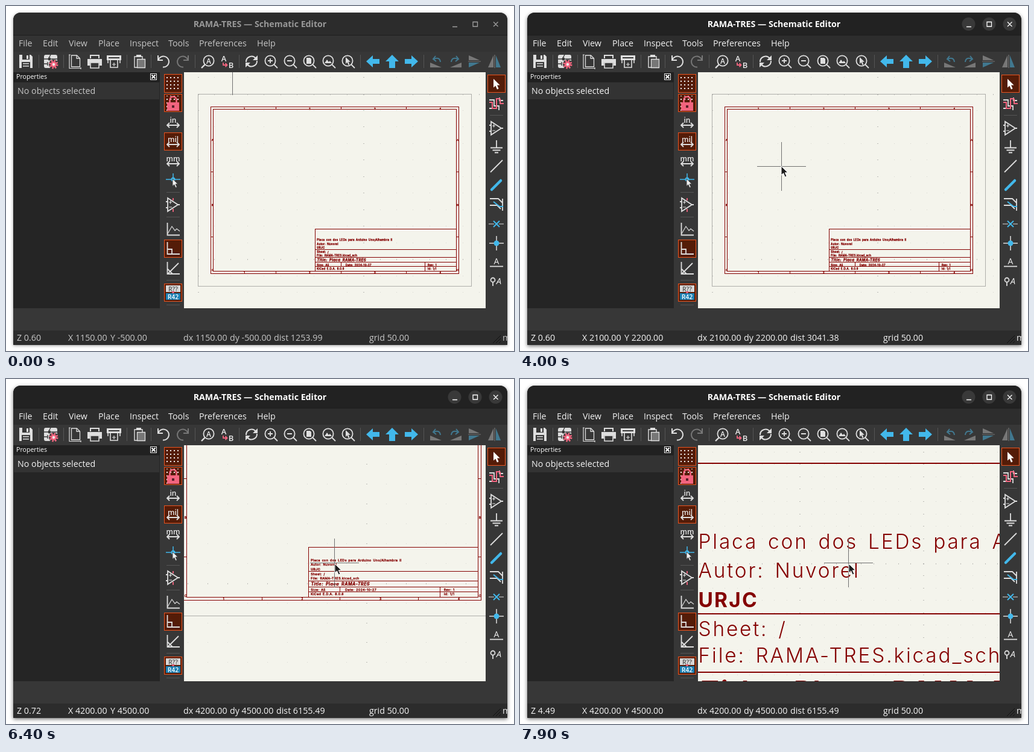
An HTML page with a canvas for the animation above (8 s loop, 842 by 573 pixels).

```html
<!DOCTYPE html>
<html lang="en">
<head>
<meta charset="utf-8">
<title>Schematic Editor</title>
<style>
html, body { margin: 0; width: 100%; height: 100%; overflow: hidden; background: #fff; }
#stage { position: relative; width: 842px; height: 573px; overflow: hidden; background: #fff; }
#shadow, #win { position: absolute; left: 12px; top: 11px; width: 819px; height: 552px; border-radius: 12px 12px 1px 1px; }
#shadow { box-shadow: 0 1px 5px rgba(0,0,0,.4); }
.focus #shadow { box-shadow: 0 2px 6px rgba(0,0,0,.55); }
#win { overflow: hidden; background: #373737; }
#ui { position: absolute; left: -12px; top: -11px; }
#view { position: absolute; left: 283px; top: 99px; }
#top { position: absolute; left: 0; top: 0; }
text { font-family: "Open Sans", "Noto Sans", sans-serif; font-size: 14.25px; white-space: pre; }
.lbl text { fill: #c6c6c6; }
.focus .lbl text { fill: #f4f4f4; }
#bar { fill: #2c2c2c; }
.focus #bar { fill: #222; }
#menu { fill: #333; }
.focus #menu { fill: #2d2d2d; }
#title { font-weight: 700; font-size: 14.2px; text-anchor: middle; fill: #989898; }
.focus #title { fill: #fff; }
#dots { fill: none; }
.focus #dots { fill: #393939; }
#ctl { fill: none; stroke: #a0a0a0; stroke-width: 1.3; }
.focus #ctl { stroke: #fff; }
.w { fill: none; stroke: #dedede; stroke-width: 1.8; }
.t { stroke-width: 1.2; }
.f { fill: #dedede; }
.b { fill: #42b8eb; }
.bl { fill: none; stroke: #42b8eb; stroke-width: 2; }
.p { fill: #f2647e; }
.pl { fill: none; stroke: #f2647e; stroke-width: 1.8; }
.k { fill: #373737; }
.kl { fill: none; stroke: #373737; stroke-width: 1.4; }
.g { fill: #777; }
.gl { fill: none; stroke: #777; stroke-width: 2; }
.bg { fill: #41788f; }
.sep { stroke: #555; stroke-width: 1; fill: none; }
.on rect { fill: #541c08; stroke: #e95420; }
.u text { font-size: 12px; font-weight: 600; text-anchor: middle; fill: #ececec; }
</style>
</head>
<body>
<div id="stage">
<div id="shadow"></div>
<div id="win">
<svg id="ui" width="842" height="573" viewBox="0 0 842 573">
  <defs>
    <g id="lens"><circle class="w" r="8.6"/><path class="w" d="M6 6l6 6" stroke-width="2.4"/></g>
    <path id="arrow" d="M0 0V14.5L3.4 11.4L6 17.4L8.6 16.3L6 10.4H10.6Z"/>
    <g id="amp"><path class="w" d="M-8-11V11L9 0ZM-11-5h3M-11 5h3M9 0h3"/><path class="w t" d="M-6-4h5M-3.500-6.500v5M-6 4h5"/></g>
    <path id="dbl" class="w" d="M-9 0H9M-6-4L-10 0L-6 4M6-4L10 0L6 4" stroke-width="1.6"/>
    <pattern id="gridDots" x="265" width="6" height="6" y="117" patternUnits="userSpaceOnUse"><rect x="1" y="1" width="2" height="2" fill="#f0f0f0"/></pattern>
  </defs>
  <rect id="menu" x="12" y="48" width="819" height="28"/>
  <rect id="bar" x="12" y="11" width="819" height="37"/>
  <rect x="12" y="48" width="819" height="1" fill="#1e1e1e"/>
  <rect x="12" y="539" width="819" height="24" fill="#2c2c2c"/>
  <rect x="12" y="110" width="243" height="392" fill="#252525"/>
  <rect x="12" y="110" width="243" height="16" fill="#212121"/>
  <rect x="13" y="127" width="241" height="28" fill="#333"/>

  <text id="title" x="421" y="35">RAMA-TRES — Schematic Editor</text>
  <g id="dots"><circle cx="743.500" cy="30" r="11"/><circle cx="777.500" cy="30" r="11"/><circle cx="811.500" cy="30" r="11"/></g>
  <path id="ctl" d="M740 34.500h8M774 26.500h7.500v7.500h-7.500zM808 26.500l7.500 7.500M815.500 26.500l-7.500 7.500"/>

  <g class="lbl">
    <text x="21" y="67">File</text><text x="61" y="67">Edit</text><text x="104" y="67">View</text>
    <text x="153" y="67">Place</text><text x="205" y="67">Inspect</text><text x="269" y="67">Tools</text>
    <text x="320" y="67">Preferences</text><text x="416" y="67">Help</text>
    <text x="19" y="146">No objects selected</text>
    <text id="sz" x="18" y="556"></text>
    <text id="sx" x="103" y="556"></text><text id="sy" x="173" y="556"></text>
    <text id="sdx" x="294" y="556"></text><text id="sdy" x="371" y="556"></text>
    <text id="sd" x="444" y="556"></text>
    <text x="602" y="556">grid 50.00</text><text x="823" y="556">mils</text>
  </g>
  <path d="M807 560l13-13M812 560l8-8M817 560l3-3" stroke="#111" fill="none"/>
  <text x="17" y="121" style="font-size:10.600px" fill="#fff">Properties</text>
  <rect x="239.500" y="112.500" width="10" height="10" fill="#191919" stroke="#eee"/>
  <path d="M241.500 114.500l6 6M247.500 114.500l-6 6" stroke="#fff" stroke-width="2"/>

  <path class="sep" d="M54.500 81v22M95.500 81v22M200.500 81v22M240.500 81v22M313.500 81v22M386.500 81v22M587.500 81v22M692.500 81v22"/>
  <!-- top toolbar -->
  <path class="f" d="M22 81h19l3 3v19H22z"/><path class="k" d="M27 81h12v8H27zM26 93h14v10H26z"/><path class="f" d="M34 82h3v6h-3zM28 95h10v1.500H28zM28 99h10v1.500H28z"/>
  <rect class="f" x="63" y="81" width="22" height="22" rx="3"/><path class="kl" d="M63 88h7l4-7M63 96h6M69 93v6M75 88h10"/><circle cx="72" cy="88" r="2.500" class="k"/>
  <circle class="k" cx="79" cy="97" r="8"/><circle class="pl" cx="79" cy="97" r="6" stroke-dasharray="2.400 2.300" style="stroke-width:3"/><circle class="p" cx="79" cy="97" r="5"/><circle cx="79" cy="97" r="2.200" fill="#eee"/>
  <path class="w" d="M108.500 82h9l5 5v14h-14zM117 82v5h5" style="stroke-width:1.300"/><path class="w t" d="M105 81v23M105 103.500h19M104 81h3M124 102v3"/>
  <path class="f" d="M139 81h16v6h-16zM135 88h24v11h-4v-5h-16v5h-4z"/><path class="w" d="M140 94h14v9h-14z" style="stroke-width:1.600"/><path class="k" d="M141 83h12v4h-12z"/>
  <path class="f" d="M167 82h24v8h-24z"/><path class="k" d="M170 85h18v2h-18z"/><path class="w" d="M173 90v12h12v-12M169 90v5M189 90v5" style="stroke-width:1.600"/><path class="w t" d="M176 97h6M179 94v6"/>
  <path class="w" d="M213 84h13v18h-13z" style="stroke-width:1.400"/><path class="f" d="M216 81h8v4h-8z"/><path d="M217.500 88.500h13v14h-13z" fill="#777" stroke="#dedede" stroke-width="1.300"/>
  <path class="w" d="M252 82v8h8M252.500 89.500A9 9 0 1 1 260 101.500" style="stroke-width:2"/>
  <path class="gl" d="M302 82v8h-8M301.500 89.500A9 9 0 1 0 294 101.500"/>
  <circle class="w" cx="336" cy="91" r="8.600"/><path class="w" d="M330 97l-6 6" style="stroke-width:2.400"/>
  <g class="u"><text x="336" y="95.500">A</text><text x="361" y="92" style="font-size:13px">A</text><text x="373" y="103" style="font-size:13px">B</text></g>
  <path class="pl" d="M360 94v4h6M363.500 95l3 3l-3 3"/>
  <path class="w" d="M398 93A9 9 0 0 1 414 87M416 91A9 9 0 0 1 400 97" style="stroke-width:2"/><path class="f" d="M417 82v8h-8zM397 102v-8h8z"/>
  <use href="#lens" x="438" y="91"/><path class="w" d="M434 91h8M438 87v8"/>
  <use href="#lens" x="470" y="91"/><path class="w" d="M466 91h8"/>
  <use href="#lens" x="502" y="91"/><path class="f" d="M498 86h6l2 2v8h-8z"/>
  <use href="#lens" x="534" y="91"/><path class="f" d="M528 95l4-6l3 4l2-2l3 4z"/>
  <use href="#lens" x="566" y="91"/><use href="#arrow" class="f" transform="translate(563 85) scale(.75)"/>
  <path class="b" d="M597 92l11-10v6h11v8h-11v6zM640 81l11 11h-6v11h-10V92h-6zM683 92l-11-10v6h-11v8h11v6z"/>
  <path class="g" d="M703 94l19 8h-19z"/><path class="gl" d="M709 88q10-4 11 5M712 83l-4 5l5 4" style="stroke:#41788f"/>
  <path class="g" d="M755 94l-19 8h19z"/><path class="gl" d="M749 88q-10-4-11 5M746 83l4 5l-5 4" style="stroke:#41788f"/>
  <path class="g" d="M767 82l18 8h-18z"/><path class="bg" d="M767 102l18-8h-18z"/><path class="gl" d="M766 92h21" style="stroke-width:1.200"/>
  <path class="g" d="M808 82v20h-9z"/><path class="bg" d="M812 82v20h8z"/><path class="gl" d="M810 81v22" style="stroke-width:1.200"/>

  <!-- left toolbar -->
  <g class="on"><rect x="262.500" y="113.500" width="29" height="30"/><rect x="262.500" y="146.500" width="29" height="29"/><rect x="262.500" y="210.500" width="29" height="29"/><rect x="262.500" y="388.500" width="29" height="29"/><rect x="262.500" y="461.500" width="29" height="29"/><rect x="798.500" y="114.500" width="29" height="29"/></g>
  <rect x="265" y="117" width="24" height="24" fill="url(#gridDots)"/><rect x="265" y="149" width="24" height="25" fill="url(#gridDots)"/>
  <path class="p" d="M267 160h20v14h-20z"/><path class="pl" d="M271.500 160v-4a5.500 5.500 0 0 1 11 0v4" style="stroke-width:2.600"/><path d="M275 165h4v4h-4z" fill="#5a1f2a"/>
  <g class="u"><text x="277" y="194">in</text><text x="277" y="226">mil</text><text x="277" y="258">mm</text></g>
  <use href="#dbl" x="277" y="198"/><use href="#dbl" x="277" y="230"/><use href="#dbl" x="277" y="262"/>
  <path class="bl" d="M265 288h24M277 278v20" style="stroke-width:1.500"/><circle class="b" cx="277" cy="288" r="3.500"/><use href="#arrow" transform="translate(276 287) scale(.85)" fill="#eee" stroke="#373737"/>
  <path class="sep" d="M266 309.500h22M266 350.500h22M266 455.500h22M266 496.500h22M802 181.500h22"/>
  <use href="#amp" x="276" y="330"/><path class="pl" d="M277 319v4M277 337v5"/>
  <path class="w" d="M267.500 360v20.500H288"/><path class="w t" d="M268 378l7-12l5 7l3-3l5 4"/>
  <path class="w" d="M267.500 392v20H288M268 404h7v8"/>
  <path class="w" d="M267.500 425v20H288M268 445l18-18M268 437l8 8"/>
  <rect x="265" y="464" width="24" height="11" fill="#d8d8d8"/><rect x="265" y="477" width="24" height="11" fill="#1a7fb3"/>
  <g class="u"><text x="277" y="473.500" style="font-size:10.500px;fill:#555">R??</text><text x="277" y="487" style="font-size:10.500px;fill:#fff">R42</text></g>
  <path class="p" d="M274 474h6l-3 4z"/>

  <!-- right toolbar -->
  <use href="#arrow" class="f" x="808" y="121" style="fill:#fff"/>
  <path class="w" d="M801 156h8v10h8v7M801 170h9M824 157h-6v-5"/><path class="pl" d="M801 160h5v10h7v-16h6M819 154v8h6" style="stroke-width:2"/>
  <use href="#amp" x="812" y="203"/>
  <path class="w" d="M813 223v12M803 235.500h20M806.500 239.500h13M810 243.500h6"/>
  <path class="w" d="M803 276l20-20"/>
  <path class="bl" d="M805 305l15-15" style="stroke-width:4.500;stroke-linecap:round"/>
  <path class="w" d="M802 320h14l7 7M802 331h12l6 6M823 320v20"/><path class="bl" d="M808 325l10 8h6"/>
  <path class="bl" d="M808 357l10 10M818 357l-10 10"/><path class="w t" d="M800 362h9M817 362h8"/>
  <path class="w" d="M801 394h24M813 382v24" style="stroke-width:1.500"/><circle class="b" cx="813" cy="394" r="4.500"/>
  <path class="w" d="M802 432.500h22"/><g class="u"><text x="813" y="429" style="font-size:14px;font-weight:400">A</text><text x="817" y="462" style="font-size:15px;font-style:italic;font-weight:400">A</text></g>
  <circle class="w" cx="807" cy="455" r="3.500"/><path class="w" d="M807 459v6"/>
</svg>
<canvas id="view" width="500" height="392"></canvas>
</div>
<svg id="top" width="842" height="573" viewBox="0 0 842 573">
  <path id="ptr" d="M0 0V15L3.600 11.700L6.200 18L9 16.800L6.300 10.800H11Z" fill="#1c1c1c" stroke="#fff" stroke-width="1"/>
</svg>
</div>
<script>
const $ = id => document.getElementById(id);
const ctx = $('view').getContext('2d');
const LOOP = 8000, MM = 39.37, UNIT = 0.0915, RED = '#840000';
const RIGHT = 7874, BOTTOM = 5433.1, MARGIN = 393.7; // page frame in mils

const linear = u => u, easeIn = u => u * u;
const easeOut = u => 1 - (1 - u) ** 2, smooth = u => u * u * (3 - 2 * u);

// pointer moves: start, end, from, to, easing
const moves = [
  [400, 1000, [213, -30], [320, 20], easeOut],
  [2000, 2100, [320, 20], [319.5, 20], linear],
  [2700, 3200, [319.5, 20], [326, 85], easeIn],
  [3500, 4000, [326, 85], [433, 266], smooth],
  [4200, 5100, [433, 266], [527, 385], linear],
  [5100, 5300, [527, 385], [548.5, 394], easeOut],
  [6300, 6400, [548.5, 394], [545, 307], linear]
];

// title block: text, mm from the right, mm from the bottom, size, style
const notes = [
  ['Placa con dos LEDs para Arduino Uno/Alhambra II', 109, 26],
  ['Autor: Nuvorel', 109, 23],
  ['URJC', 109, 20, 1.5, 'bold'],
  ['Sheet: /', 109, 17],
  ['File: RAMA-TRES.kicad_sch', 109, 14.3],
  ['Title: Placa RAMA-TRES', 109, 10.7, 2, 'italic bold'],
  ['Size: A5', 109, 6.9], ['Date: 2024-10-27', 87, 6.9], ['Rev: 1', 24, 6.9],
  ['KiCad E.D.A. 8.0.6', 109, 4.1], ['Id: 1/1', 24, 4.1]
];
const rules = [[110, 18.5, 2, 18.5], [110, 12.5, 2, 12.5], [110, 8.5, 2, 8.5],
  [110, 5.5, 2, 5.5], [90, 8.5, 90, 5.5], [26, 8.5, 26, 2]];

function pointer(t) {
  let p = [0, -60];
  for (const [a, b, from, to, ease] of moves) {
    if (t <= a) break;
    const u = ease(Math.min(1, (t - a) / (b - a)));
    p = from.map((v, i) => v + (to[i] - v) * u);
  }
  return p;
}

function zoomAt(t) {
  if (t < 6400) return 0.6;
  const n = Math.min(8, (t - 6400) / 100) + Math.max(0, Math.min(4, (t - 7500) / 100));
  return 0.72 * 1.1648 ** n;
}

function drawSheet(s, ox, oy) {
  const X = x => ox + x * s, Y = y => oy + y * s;
  const lw = Math.max(1, Math.round(5.9 * s));
  const snap = v => lw % 2 ? Math.floor(v) + 0.5 : Math.round(v);
  const line = (a, b, c, d) => {
    ctx.beginPath();
    ctx.moveTo(snap(X(a)), snap(Y(b)));
    ctx.lineTo(snap(X(c)), snap(Y(d)));
    ctx.stroke();
  };
  const box = (a, b, c, d) => ctx.strokeRect(snap(X(a)), snap(Y(b)),
    snap(X(c)) - snap(X(a)), snap(Y(d)) - snap(Y(b)));
  const label = (str, x, y, mm = 1.5, style = '') => {
    const cap = mm * MM * s, size = cap / 0.727, bold = style.includes('bold');
    ctx.font = `${style || '300'} ${size}px Inter, Roboto, sans-serif`;
    ctx.letterSpacing = size * (bold ? 0.065 : 0.085) + 'px';
    ctx.wordSpacing = size * (bold ? 0.26 : 0.14) + 'px';
    const px = X(x) + 0.12 * size, py = Y(y) + cap / 2 + 0.5;
    ctx.fillText(str, px, py);
    const extra = (1 - 5.9 * s) * (bold ? 0.5 : 0.8);
    if (extra > 0.05) { ctx.lineWidth = extra; ctx.strokeText(str, px, py); }
  };

  // grid
  const step = 50 * s < 10 ? 500 : 50, major = step * 10;
  const first = (edge, o) => Math.ceil((edge - o) / s / step) * step;
  for (let x = first(295, ox); X(x) < 795; x += step)
    for (let y = first(110, oy); Y(y) < 502; y += step) {
      const mx = x % major === 0, my = y % major === 0;
      ctx.fillStyle = mx || my ? '#bcbcb7' : '#d6d6d0';
      ctx.fillRect(Math.floor(X(x)), Math.floor(Y(y)), mx ? 2 : 1, my ? 2 : 1);
    }

  ctx.lineWidth = lw;
  ctx.strokeStyle = '#aeaeaa';
  box(0, 0, RIGHT + MARGIN, BOTTOM + MARGIN);
  ctx.strokeStyle = ctx.fillStyle = RED;
  const in2 = 2 * MM;
  box(MARGIN, MARGIN, RIGHT, BOTTOM);
  box(MARGIN + in2, MARGIN + in2, RIGHT - in2, BOTTOM - in2);
  box(RIGHT - 110 * MM, BOTTOM - 34 * MM, RIGHT - in2, BOTTOM - in2);
  for (const [a, b, c, d] of rules)
    line(RIGHT - a * MM, BOTTOM - b * MM, RIGHT - c * MM, BOTTOM - d * MM);

  // frame ticks and references
  for (let i = 1; i < 4; i++) {
    const p = MARGIN + i * 50 * MM;
    line(p, MARGIN, p, MARGIN + in2);
    line(p, BOTTOM - in2, p, BOTTOM);
    if (i < 3) {
      line(MARGIN, p, MARGIN + in2, p);
      line(RIGHT - in2, p, RIGHT, p);
    }
  }
  for (let i = 0; i < 4; i++) {
    const p = MARGIN + (i * 50 + 25) * MM;
    label(i + 1, p, MARGIN + MM, 1.3);
    label(i + 1, p, BOTTOM - MM, 1.3);
    if (i < 3) {
      label('ABC'[i], MARGIN + 0.4 * MM, p, 1.3);
      label('ABC'[i], RIGHT - 1.6 * MM, p, 1.3);
    }
  }
  for (const [str, x, y, mm, style] of notes)
    label(str, RIGHT - x * MM, BOTTOM - y * MM, mm, style);
}

function drawCross(x, y) {
  ctx.fillStyle = '#707070';
  ctx.fillRect(x - 40, y, 81, 1);
  ctx.fillRect(x, y - 40, 1, 81);
}

function render(t) {
  const zoom = zoomAt(t), s = zoom * UNIT, zoomed = t >= 6400;
  const ox = zoomed ? 545.2 - 4200 * s : 318.05;
  const oy = zoomed ? 306.2 - 4500 * s : 146.05;
  const [px, py] = pointer(t);
  const grid = v => Math.round(v / 50) * 50;
  let mx = 1150, my = -500, cx = 375, cy = 107;
  if (zoomed) {
    [mx, my, cx, cy] = [4200, 4500, 544, 305];
  } else if (t > 3500 && py > 110) {
    mx = grid((px - ox) / s);
    my = grid((py - oy) / s);
    cx = Math.floor(ox + mx * s);
    cy = Math.floor(oy + my * s);
  }

  ctx.setTransform(1, 0, 0, 1, -295, -110);
  ctx.fillStyle = '#f4f4ec';
  ctx.fillRect(295, 110, 500, 392);
  drawSheet(s, ox, oy);
  drawCross(cx, cy);

  $('stage').className = t >= 1900 ? 'focus' : '';
  $('ptr').setAttribute('transform', `translate(${px} ${py})`);
  const put = (id, str) => { $(id).textContent = str; };
  put('sz', 'Z ' + zoom.toFixed(2));
  put('sx', 'X ' + mx.toFixed(2));
  put('sy', 'Y ' + my.toFixed(2));
  put('sdx', 'dx ' + mx.toFixed(2));
  put('sdy', 'dy ' + my.toFixed(2));
  put('sd', 'dist ' + Math.hypot(mx, my).toFixed(2));
  $('sd').setAttribute('x', my < 0 ? 444 : 448);
}

const start = performance.now();
let last = -1;
function tick() {
  const t = Math.floor((performance.now() - start) % LOOP / 100) * 100;
  if (t !== last) render(last = t);
  requestAnimationFrame(tick);
}
tick();
</script>
</body>
</html>
```
